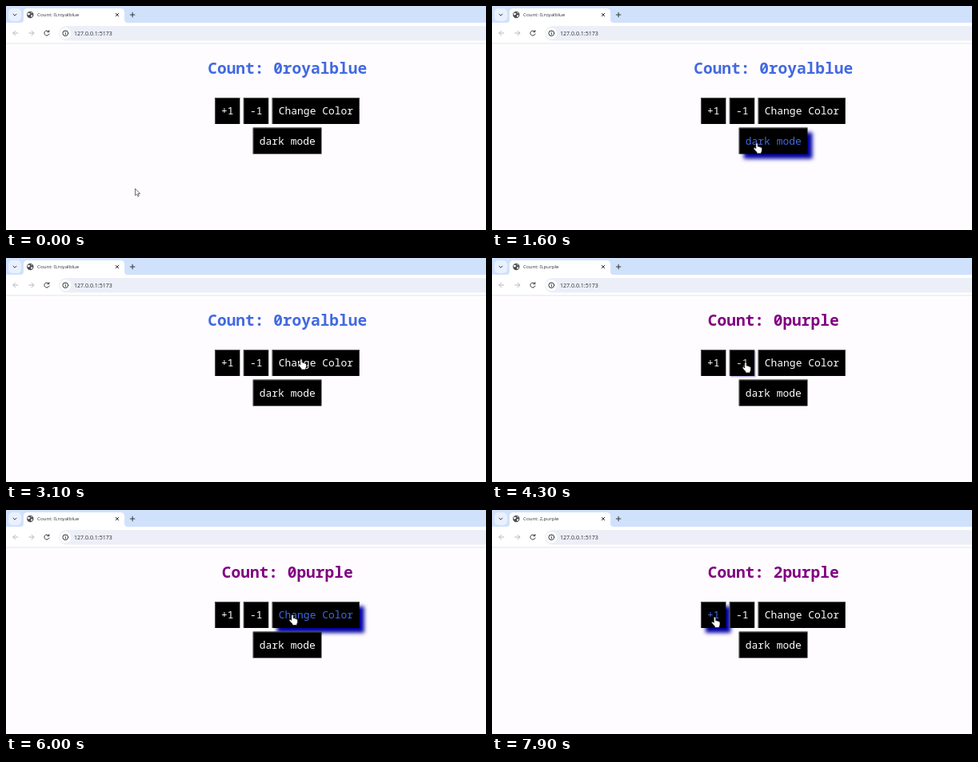
An HTML page that plays this animation: 600 by 281 pixels, repeating every 8000 ms.

```html
<!DOCTYPE html>
<html lang="en">
<head>
<meta charset="utf-8">
<title>Counter</title>
<style>
  html, body { margin: 0; width: 100%; height: 100%; overflow: hidden; background: #fefcff; }
  svg { display: block; width: 100%; height: 100%; }
  text { white-space: pre; }
  .ui { font-family: "Open Sans", "Noto Sans", sans-serif; fill: #2b2d31; }
  .mono { font-family: "Noto Sans Mono", "DejaVu Sans Mono", monospace; text-anchor: middle; }
  .line { fill: none; stroke: #33363a; stroke-width: 1; stroke-linecap: round; stroke-linejoin: round; }
  .off { stroke: #b4b6bb; }
</style>
</head>
<body>
<svg viewBox="0 0 600 281">
  <rect width="600" height="281" fill="#fefcff"/>

  <!-- browser tab strip -->
  <rect width="600" height="21" fill="#d0e1fc"/>
  <rect x="3" y="3" width="16" height="16" rx="5" fill="#e9f0fe"/>
  <path class="line" d="M9 10.2l2 2 2-2"/>
  <path d="M18 21q4 0 4-4V8q0-5 5-5h116q5 0 5 5v9q0 4 4 4z" fill="#fff"/>
  <circle cx="30.3" cy="11" r="4.2" fill="#4a4d52"/>
  <path d="M27 9.2l2.2-.6 1 1.5-1.4 1.5-1.8-.7zM31.2 11.2l2.2.2-.6 1.8-1.5.8zM31 7.6l1.8.9-1 .9z" fill="#fff"/>
  <text id="tab" class="ui" x="39" y="13.3" font-size="6.16"></text>
  <path class="line" d="M137.2 9.2l3.6 3.6m0-3.6l-3.6 3.6M155.3 11h5.6m-2.8-2.8v5.6"/>

  <!-- toolbar -->
  <rect y="21" width="600" height="26" fill="#fff"/>
  <rect x="66" y="25" width="560" height="18.5" rx="9.2" fill="#eceff7"/>
  <rect y="46.6" width="600" height=".8" fill="#dcdfe6"/>
  <path class="line off" d="M14.8 34H8.8m2.8-2.8L8.8 34l2.8 2.8M28.8 34h6m-2.8-2.8l2.8 2.8-2.8 2.8"/>
  <path class="line" d="M53.4 32A3.1 3.1 0 1 0 54 35M53.9 30.6v2h-2"/>
  <circle cx="74.3" cy="34.2" r="7" fill="#fff"/>
  <circle class="line" cx="74.3" cy="34.2" r="3.4"/>
  <path class="line" d="M74.3 34v1.9m0-3.7v.1"/>
  <text class="ui" x="85" y="36.7" font-size="7.07">127.0.0.1:5173</text>

  <!-- page -->
  <rect id="dark" x="4" y="51.5" width="596" height="136" fill="#000"/>
  <text id="head" class="mono" x="351.7" y="85.3" font-size="19.5" font-weight="700"></text>
  <g id="buttons"></g>

  <path id="arrow" d="M0 0V8.7L2 6.9 3.4 9.9 4.8 9.2 3.5 6.4H6.1Z" fill="#fff" stroke="#333" stroke-width=".7"/>
  <path id="hand" d="M-1.2 1Q-1.2-.2 0-.2T1.2 1V4.2Q2.5 3.7 3 4.7 4.4 4.2 4.8 5.4 6.5 5 6.5 6.7V9Q6.4 10.5 5.6 11.5V13H0V11.6Q-2 9.4-4 6.9-4 5.2-2.4 5.8L-1.2 6.9Z"
        fill="#fff" stroke="#111" stroke-width=".7"/>
</svg>
<script>
const LOOP = 8000, STEP = 100, TAB_LAG = 100;
const $ = id => document.getElementById(id);
const clamp = (v, lo = 0, hi = 1) => Math.min(hi, Math.max(lo, v));
const smooth = k => k * k * (3 - 2 * k);

// pointer: a resting place, then eased moves
const rest = [161.5, 229];
const moves = [
  { from: 200, to: 1000, x: 331, y: 172 },
  { from: 1600, to: 2100, x: 338.5, y: 165.5 },
  { from: 2700, to: 3050, x: 369, y: 127 },
  { from: 3600, to: 4100, x: 317, y: 131 },
  { from: 4500, to: 4900, x: 358, y: 131.5 },
  { from: 6200, to: 6700, x: 278.5, y: 134.5 }
];
const clicks = [
  { at: 1700, set: { dark: true } },
  { at: 2700, set: { dark: false } },
  { at: 3600, set: { color: "purple" } },
  { at: 5100, set: { color: "royalblue" } },
  { at: 5900, set: { color: "purple" } },
  { at: 6800, set: { count: 1 } },
  { at: 7400, set: { count: 2 } }
];

// button width follows from its label in the fixed-pitch font
const SIZE = 12.95, PAD = 15.8, HEIGHT = 33, GAP = 4.5;
const buttons = [];

function addRow(x, y, labels) {
  for (const label of labels) {
    const w = label.length * SIZE * .6 + PAD;
    buttons.push({ label, x, y, w, h: HEIGHT });
    x += w + GAP;
  }
}
addRow(261, 115, ["+1", "-1", "Change Color"]);
addRow(308.7, 152.6, ["dark mode"]);

function add(tag, attrs, parent) {
  const el = document.createElementNS("http://www.w3.org/2000/svg", tag);
  for (const k in attrs) el.setAttribute(k, attrs[k]);
  return parent.appendChild(el);
}

for (const b of buttons) {
  const g = add("g", { transform: `translate(${b.x} ${b.y})` }, $("buttons"));
  const box = { width: b.w, height: b.h };
  b.shadow = add("rect", { ...box, fill: "#0000a0" }, g);
  add("rect", { ...box, fill: "#000" }, g);
  b.edge = add("path", { fill: "none", stroke: "#606060", "stroke-width": .9 }, g);
  b.text = add("text", {
    class: "mono", x: b.w / 2 + .2, y: 21.4, "font-size": SIZE, "font-weight": 500
  }, g);
  b.text.textContent = b.label;
}

function pointer(t) {
  let [x, y] = rest;
  for (const m of moves) {
    const k = smooth(clamp((t - m.from) / (m.to - m.from)));
    x += (m.x - x) * k;
    y += (m.y - y) * k;
  }
  return [x, y];
}

const over = (b, [x, y]) => x >= b.x && x <= b.x + b.w && y >= b.y && y <= b.y + b.h;

// hover fades in after a short delay and out faster
function hover(b, t) {
  let level = -.5;
  for (let s = 0; s < t; s += STEP) level = clamp(level + (over(b, pointer(s)) ? .25 : -.5), -.5);
  return Math.max(0, level);
}

function stateAt(t) {
  const s = { dark: false, color: "royalblue", count: 0 };
  for (const c of clicks) if (t >= c.at + STEP) Object.assign(s, c.set);
  return s;
}

function drawButton(b, t, pressed) {
  const k = hover(b, t), { w, h } = b, e = .45;
  const mix = (from, to) => Math.round(from + (to - from) * k);
  b.text.setAttribute("fill", `rgb(${mix(255, 65)},${mix(255, 105)},${mix(255, 225)})`);
  b.shadow.style.display = k ? "" : "none";
  b.shadow.style.opacity = k;
  b.shadow.style.filter = `blur(${2.8 * k}px)`;
  b.shadow.setAttribute("transform", `translate(${6 * k} ${6 * k})`);
  b.edge.setAttribute("d", pressed ? `M0 ${h - e}H${w - e}V0` : `M${e} ${h}V${e}H${w}`);
}

function draw(time) {
  const t = Math.floor(time % LOOP / STEP) * STEP;
  const pos = pointer(t), now = stateAt(t), tab = stateAt(t - TAB_LAG);
  const target = buttons.find(b => over(b, pos));
  const down = clicks.some(c => c.at === t);

  $("dark").style.display = now.dark ? "" : "none";
  $("head").textContent = `Count: ${now.count}${now.color}`;
  $("head").setAttribute("fill", now.color);
  $("tab").textContent = `Count: ${tab.count},${tab.color}`;
  for (const b of buttons) drawButton(b, t, down && b === target);

  for (const id of ["arrow", "hand"]) {
    $(id).style.display = (id === "hand") === !!target ? "" : "none";
    $(id).setAttribute("transform", `translate(${pos})`);
  }
}

const start = performance.now();
function tick() {
  draw(performance.now() - start);
  requestAnimationFrame(tick);
}
tick();
</script>
</body>
</html>
```
